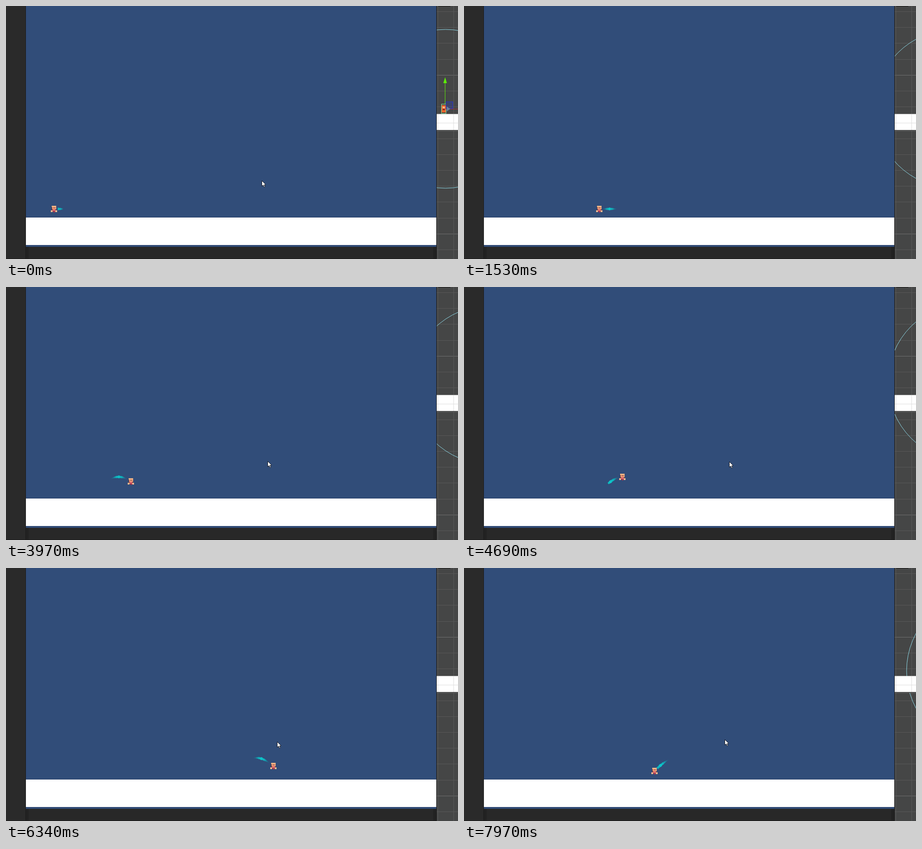
An HTML page with a canvas that plays this animation: 999x561 px, repeating every 8 s.

```html
<!DOCTYPE html>
<html>
<head>
<meta charset="utf-8">
<style>
html, body { margin: 0; width: 100%; height: 100%; overflow: hidden; background: #282828; }
canvas { display: block; }
</style>
</head>
<body>
<canvas id="stage" width="999" height="561"></canvas>
<script>
const ctx = document.getElementById('stage').getContext('2d');
const LOOP = 8000, GROUND = 450, START_X = 141;
const RUN_SPEED = 0.3, HOP_SPEED = 0.345;      // px per ms
const HOP_LENGTH = 96, HOP_HEIGHT = 29;
const SCENE_SCALE = 0.58;                      // editor view against game view

const run = (start, distance) => ({ start, distance, speed: RUN_SPEED, height: 0 });
const hop = (start, distance) => ({ start, distance, speed: HOP_SPEED, height: HOP_HEIGHT });
const moves = [
  run(-162, -35), run(30, 321), run(1105, -216), run(3700, -10),
  hop(3755, 102), hop(4555, 101), hop(5345, 102), hop(6096, 113), hop(6905, -102), hop(7655, -96)
];

const glide = (start, duration, x, y) => ({ start, duration, x, y });
const glides = [
  glide(1400, 100, 915, 482), glide(3210, 110, 571, 385), glide(3690, 580, 586, 387),
  glide(6100, 200, 599, 385), glide(7670, 270, 576, 380)
];

const clamp01 = v => Math.max(0, Math.min(1, v));

function heroAt(t) {
  let x = START_X, y = GROUND, moved = 0;
  for (const m of moves.filter(m => m.start <= t)) {
    moved = Math.min((t - m.start) * m.speed, Math.abs(m.distance));
    x += Math.sign(m.distance) * moved;
    y = GROUND - m.height * Math.sin(Math.PI * clamp01(moved / HOP_LENGTH));
  }
  return { x, y, moved };
}

function cursorAt(t) {
  return glides.reduce((p, g) => {
    const k = clamp01((t - g.start) / g.duration);
    return { x: p.x + (g.x - p.x) * k, y: p.y + (g.y - p.y) * k };
  }, { x: 565, y: 387 });
}

function rect(color, x, y, w, h) {
  ctx.fillStyle = color;
  ctx.fillRect(x, y, w, h);
}

function frameRect(color, x, y, w, h) {
  ctx.strokeStyle = color;
  ctx.lineWidth = 1;
  ctx.strokeRect(x + .5, y + .5, w - 1, h - 1);
}

function poly(points, fill, stroke) {
  ctx.beginPath();
  points.forEach(([x, y]) => ctx.lineTo(x, y));
  ctx.closePath();
  ctx.fillStyle = fill;
  ctx.fill();
  if (!stroke) return;
  ctx.strokeStyle = stroke;
  ctx.lineWidth = 1;
  ctx.stroke();
}

function drawSprite(x, y) {
  ctx.save();
  ctx.translate(Math.round(x), Math.round(y));
  rect('#5a3038', -5, -5, 10, 11);
  rect('#f3b585', -5, -7, 10, 3);
  rect('#eb9d78', -4, -4, 9, 5);
  rect('#7a3a42', -2, -3, 5, 1);
  rect('#d9646a', -3, 1, 6, 4);
  for (const side of [-7, 3]) rect('#f4b890', side, 3, 4, 4);
  rect('#a8304e', -1, 5, 3, 3);
  ctx.restore();
}

function drawTrail(t, hero) {
  const oldest = 130, newest = 25;
  for (let age = oldest; age > newest; age -= 3) {
    const p = heroAt(t - age), next = heroAt(t - age + 4);
    if (p.moved < 15 || Math.hypot(p.x - hero.x, p.y - hero.y) < 9) continue;
    const strength = Math.sin(Math.PI * (age - newest) / (oldest - newest));
    const ragged = 0.75 + 0.25 * Math.sin(age * age);
    ctx.strokeStyle = `rgba(10,${150 + 60 * strength},${165 + 45 * strength},${0.1 + 0.8 * strength ** 1.5})`;
    ctx.lineWidth = 1 + 5 * ragged * strength ** 1.5;
    ctx.beginPath();
    ctx.moveTo(p.x, p.y);
    ctx.lineTo(next.x, next.y);
    ctx.stroke();
  }
}

function drawGame(t, hero) {
  rect('#2a2a2a', 0, 0, 44, 561);
  rect('#191919', 43, 0, 1, 561);
  rect('#314d79', 44, 0, 907, 534);
  rect('#263c66', 44, 468, 907, 63);
  rect('#fff', 44, 469, 907, 61);
  rect('#222', 44, 534, 907, 27);
  rect('#282828', 50, 534, 894, 27);
  rect('#191919', 0, 560, 952, 1);
  drawTrail(t, hero);
  drawSprite(hero.x, hero.y);
}

function drawGizmo(x, y) {
  rect('#e8642a', x - 7, y - 8, 9, 16);
  rect('#f3b585', x - 5, y - 5, 5, 4);
  rect('#8a2c2a', x - 5, y, 5, 3);
  frameRect('#8ee69a', x - 8, y - 11, 11, 22);
  rect('rgba(40,60,190,.3)', x + 2, y - 16, 15, 15);
  frameRect('#2432d0', x + 2, y - 16, 16, 16);
  rect('#a03436', x + 1, y, 40, 1);
  poly([[x + 4, y - 5], [x + 12, y], [x + 4, y + 6]], '#6a7f9c');
  rect('#5ded08', x, y - 60, 1, 49);
  poly([[x + .5, y - 70], [x + 4.5, y - 57], [x - 3.5, y - 57]], '#5ded08');
}

function drawScene(hero) {
  const x = 971.5 + (hero.x - 106) * SCENE_SCALE;
  const y = 228 - (GROUND - hero.y) * SCENE_SCALE;
  ctx.save();
  ctx.beginPath();
  ctx.rect(952, 0, 47, 561);
  ctx.clip();
  rect('#454646', 952, 0, 47, 561);
  for (let i = 0; i < 16; i++) {
    rect(i % 10 === 4 ? '#707070' : '#595959', 952, Math.round(12 + i * 35.2), 47, 1);
  }
  for (const column of [954, 989]) rect('#595959', column, 0, 1, 561);
  rect('#111', 955, 0, 27, 1);

  ctx.strokeStyle = '#8fdcea';
  ctx.lineWidth = 1;
  ctx.beginPath();
  ctx.arc(x, y, 176, 0, Math.PI * 2);
  ctx.stroke();

  rect('#fff', 952, 239.5, 47, 35.5);
  rect('#ddd', 952, 259, 47, 1);
  for (const column of [954, 989]) rect('#ddd', column, 240, 1, 35);
  rect('#1c1c1c', 952, 275, 47, 1);
  rect('#777', 952, 276, 47, 1);
  drawGizmo(Math.floor(x) - 1, Math.round(y));
  ctx.restore();
  rect('#191919', 951, 0, 1, 561);
}

function drawCursor(t) {
  if (t > 1500 && t < 3210) return;
  const { x, y } = cursorAt(t);
  ctx.save();
  ctx.translate(Math.round(x) + .5, Math.round(y) + .5);
  poly([[0, 0], [0, 12], [3, 9.5], [5, 14], [7, 13], [5, 9], [8.5, 8.5]], '#fff', '#15151c');
  ctx.restore();
}

function frame(now) {
  const t = now % LOOP, hero = heroAt(t);
  drawGame(t, hero);
  drawScene(hero);
  drawCursor(t);
  requestAnimationFrame(frame);
}
requestAnimationFrame(frame);
</script>
</body>
</html>
```
